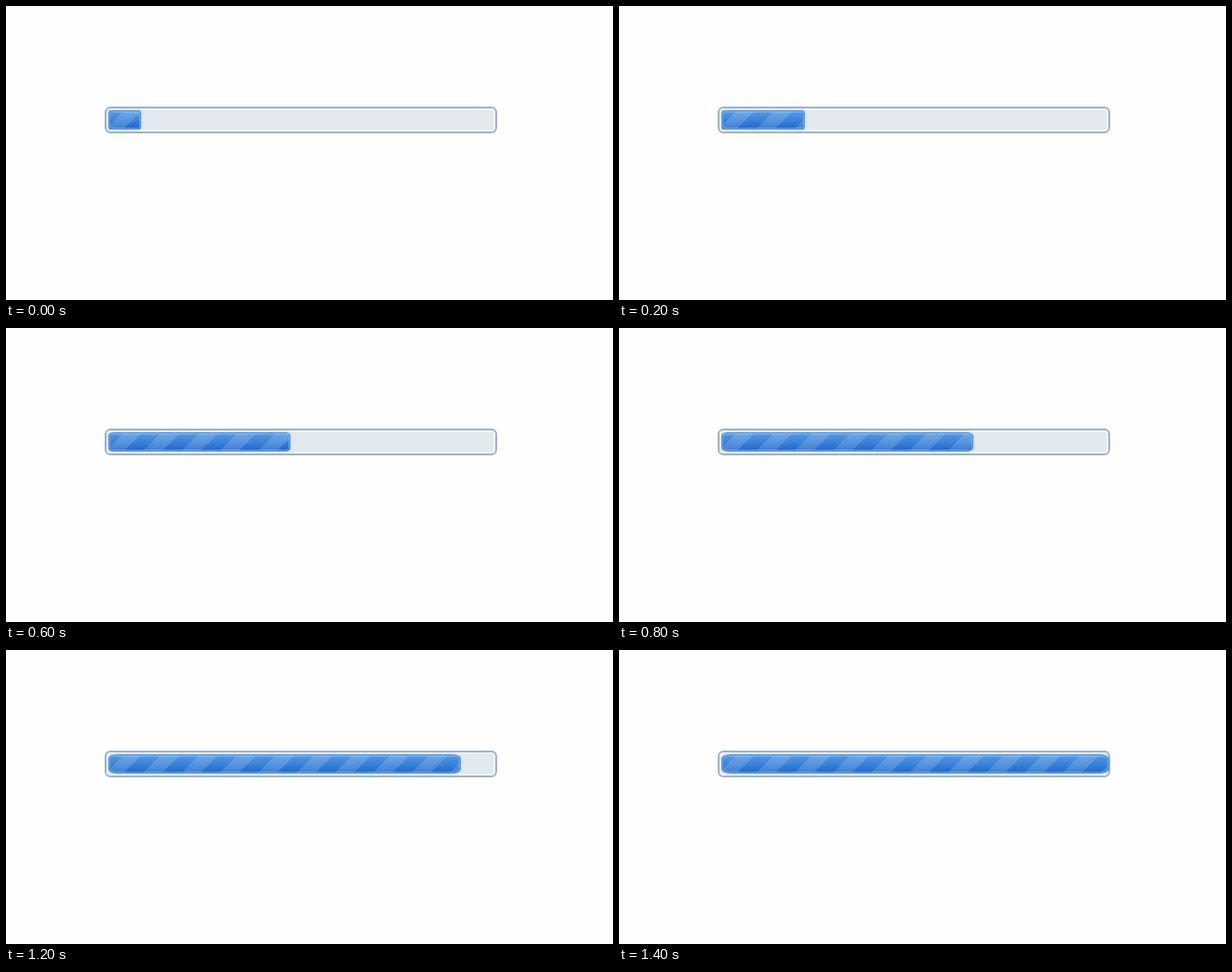
An HTML page for the animation above (1.6 s loop, 634 by 307 pixels).

```html
<!DOCTYPE html>
<html lang="en">
<head>
<meta charset="utf-8">
<title>Progress bar</title>
<style>
html, body { margin: 0; width: 100%; height: 100%; overflow: hidden; background: #fefefe; }
div { position: absolute; box-sizing: border-box; }
#track {
  left: 103px; top: 105px; width: 410px; height: 28px;
  border: 2px solid #9fb4cb; border-radius: 6px;
  background: #e2e9ef;
  box-shadow: inset 0 0 0 1.5px #f8fafc;
}
#bar {
  left: 107px; top: 109px; width: 34px; height: 20px;
  border: 1px solid #4b8fd6;
  background:
    linear-gradient(#78b0ea, #78b0ea00 2px),
    linear-gradient(#5597e1, #3f85da 45%, #1d68cb);
  box-shadow: 0 0 3px #5078b466;
  overflow: hidden;
}
#stripes {
  left: 0; top: 0; width: 410px; height: 18px;
  /* slanted bands repeating every 40px across */
  background: repeating-linear-gradient(135deg,
    #fff0 0 9.9px, #ffffff26 9.9px 24.04px, #fff0 24.04px 28.28px);
}
#gloss {
  inset: 0; border: 1px solid #8fc0f488; border-radius: inherit;
}
</style>
</head>
<body>
<div id="track"></div>
<div id="bar"><div id="stripes"></div><div id="gloss"></div></div>
<script>
const bar = document.getElementById("bar");
const widths = [34, 87, 131, 190, 263, 323, 368, 405];
const STEP = 200;

function draw(now) {
  const w = widths[Math.floor(now / STEP) % widths.length];
  bar.style.width = w + "px";
  // corners stretch sideways as the bar grows
  bar.style.borderRadius = `${1.5 + w * 0.022}px / ${2 + w * 0.007}px`;
  requestAnimationFrame(draw);
}
draw(0);
</script>
</body>
</html>
```
